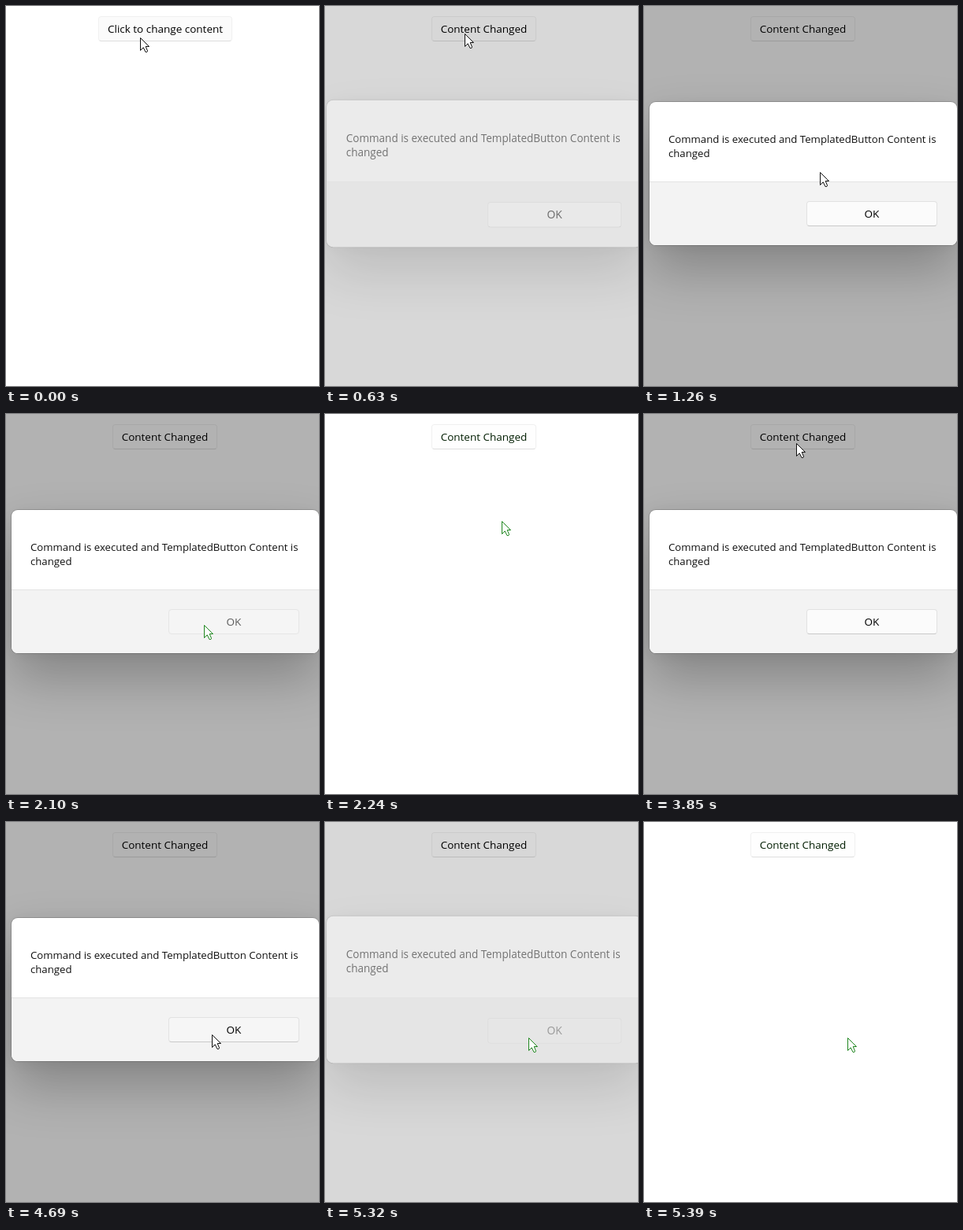
These frames come from a looping animation (397x483 px, 6.02 s). An HTML page:

```html
<!DOCTYPE html>
<html lang="en">
<head>
<meta charset="utf-8">
<style>
  html, body { margin: 0; width: 100%; height: 100%; overflow: hidden; background: #fff; }
  body { position: relative; font: 13.5px/18px "Open Sans", "Noto Sans", sans-serif; color: #000; }
  div, svg { position: absolute; box-sizing: border-box; }
  .button {
    height: 32px; border: 1px solid #f0f0f0; border-bottom-color: #dedede; border-radius: 4px;
    background: #fbfbfb; line-height: 31px; text-align: center; white-space: nowrap;
  }
  #main { top: 13px; left: 117px; width: 170px; }
  #main.changed { left: 135px; width: 133px; background: #fefefe; }
  #main.down { color: #5d5d5d; border-color: #efefef; background: #fcfcfc; }
  #smoke { inset: 0; background: #000; }
  #dialog {
    left: 7px; top: 122px; width: 390px; height: 182px; border-radius: 8px; background: #fff;
    box-shadow: 0 0 0 1px rgba(0,0,0,.16), 0 32px 64px rgba(0,0,0,.25), 0 2px 20px rgba(0,0,0,.06);
  }
  #message { left: 24px; top: 38px; font-size: 13.2px; color: #111; white-space: nowrap; }
  #footer {
    left: 0; right: 0; top: 101px; bottom: 0; background: #f3f3f3;
    border-top: 1px solid #e3e3e3; border-radius: 0 0 8px 8px;
  }
  #ok { left: 199px; top: 126px; width: 166px; border-color: #e2e2e2; border-bottom-color: #c9c9c9; }
  #ok.hover { background: #f6f6f6; }
  #ok.down { color: #5d5d5d; border-color: #e5e5e5; background: #f5f5f5; }
</style>
</head>
<body>
<div id="main" class="button"></div>
<div id="smoke"></div>
<div id="dialog">
  <div id="message">Command is executed and TemplatedButton Content is<br>changed</div>
  <div id="footer"></div>
  <div id="ok" class="button">OK</div>
</div>
<svg id="cursor" width="14" height="21">
  <path d="M.5 .5V16.5L4.2 12.8L7 18.5H8.8L9.5 17L7.2 11.5H11.5Z" fill="#fff"/>
</svg>
<script>
const LOOP = 6020, STEP = 70, FADE = 140;
const [main, smoke, dialog, ok, cursor] =
  ["main", "smoke", "dialog", "ok", "cursor"].map(id => document.getElementById(id));

// Each click on the main button opens the dialog, each OK closes it
const rounds = [
  { press: 280, open: 630, accept: 2100, close: 2240 },
  { press: 3500, open: 3640, accept: 5250, close: 5390 }
];

const home = { x: 170, y: 40 };
const moves = [
  { from: 0, to: 420, x: 177, y: 35 },
  { from: 1050, to: 1610, x: 251, y: 268 },
  { from: 2100, to: 2670, x: 193, y: 37 },
  { from: 4010, to: 4690, x: 261, y: 270 },
  { from: 4830, to: 4900, x: 258, y: 274 }
];

const clamp = v => Math.min(1, Math.max(0, v));
const easeOut = (k, power) => 1 - (1 - k) ** power;
const during = (t, a, b) => rounds.some(r => t >= r[a] && t < r[b]);

// The pointer slows down sooner vertically than horizontally
function pointer(t) {
  let { x, y } = home;
  for (const m of moves) {
    const k = clamp((t - m.from) / (m.to - m.from));
    x += (m.x - x) * easeOut(k, 2.12);
    y += (m.y - y) * easeOut(k, 3);
  }
  return [Math.floor(x), Math.floor(y)];
}

function visibility(t) {
  return Math.max(...rounds.map(r =>
    clamp((t - r.open + STEP) / FADE) * clamp((r.close - t) / FADE)));
}

function draw(t) {
  const [x, y] = pointer(t);
  const shown = visibility(t);
  const changed = t >= rounds[0].open;
  const green = rounds.some(r => t >= r.accept && t < r.close + 630);

  main.textContent = changed ? "Content Changed" : "Click to change content";
  main.className = "button";
  main.classList.toggle("changed", changed);
  main.classList.toggle("down", during(t, "press", "open"));
  main.style.color = green && !shown ? "#031f03" : "";

  smoke.style.opacity = shown * .302;
  dialog.style.opacity = shown;
  dialog.style.transform = `scale(${1 + (1 - shown) * .05})`;
  ok.classList.toggle("hover", x >= 206 && y >= 248);
  ok.classList.toggle("down", during(t, "accept", "close"));

  cursor.style.left = x + "px";
  cursor.style.top = y + "px";
  cursor.style.stroke = green ? "#1f861f" : "#111";
}

const start = performance.now();
function tick() {
  const t = (performance.now() - start) % LOOP;
  draw(Math.floor(t / STEP) * STEP);
  requestAnimationFrame(tick);
}
tick();
</script>
</body>
</html>
```
